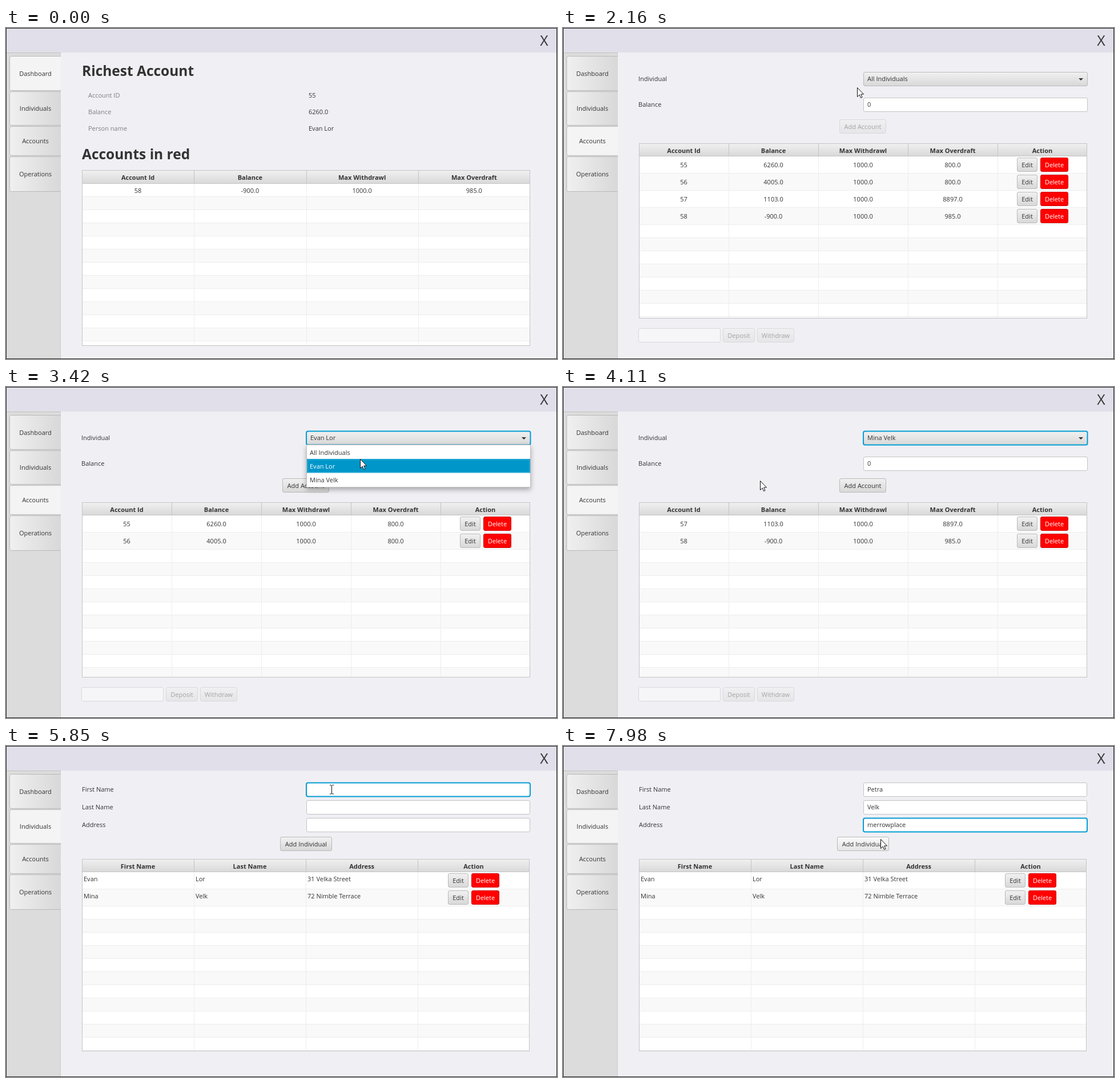
Write an HTML page that moves like this. It is 965 px wide and 580 px high and loops after 8 s.

```html
<!DOCTYPE html>
<html lang="en">
<head>
<meta charset="utf-8">
<title>Bank accounts</title>
<style>
html, body { margin: 0; width: 100%; height: 100%; overflow: hidden; background: #f0eff4; }
svg { display: block; font: 11px "Open Sans", "Noto Sans", sans-serif; }
.popup { filter: drop-shadow(0 4px 4px rgba(0, 0, 0, .3)); }
</style>
</head>
<body>
<svg width="965" height="580" viewBox="0 0 965 580">
  <defs>
    <linearGradient id="down" x2="0" y2="1"><stop stop-color="#f1f1f1"/><stop offset="1" stop-color="#d8d8d8"/></linearGradient>
    <linearGradient id="lit" x2="0" y2="1"><stop stop-color="#fafafa"/><stop offset="1" stop-color="#e4e4e4"/></linearGradient>
    <linearGradient id="across"><stop stop-color="#f0f0f0"/><stop offset="1" stop-color="#d8d8d8"/></linearGradient>
  </defs>
  <g id="view"></g>
</svg>
<script>
const LOOP = 8000, STEP = 30;
const INK = '#333', EDGE = '#b9b9b9', BLUE = '#0096c9', RING = '#039ed3';
const PEOPLE = ['All Individuals', 'Evan Lor', 'Mina Velk'];
const ACCOUNTS = [
  ['55', '6260.0', '1000.0', '800.0'],
  ['56', '4005.0', '1000.0', '800.0'],
  ['57', '1103.0', '1000.0', '8897.0'],
  ['58', '-900.0', '1000.0', '985.0']
];
const PERSONS = [['Evan', 'Lor', '31 Velka Street'], ['Mina', 'Velk', '72 Nimble Terrace']];
const TABS = [['Dashboard', 49, 61], ['Individuals', 111, 60], ['Accounts', 172, 52], ['Operations', 225, 62]];
const FIELDS = [['First Name', 64], ['Last Name', 95], ['Address', 126]];

// [start time, tab index]
const SCREENS = [[0, 0], [1110, 1], [1800, 2], [4350, 3], [4890, 1]];
// pointer path: [time, x, y]
const PATH = [
  [630, 895, 206], [900, 36, 142], [1530, 36, 142], [1680, 45, 200], [2040, 45, 200],
  [2160, 515, 104], [2340, 605, 86], [2490, 605, 86], [2640, 598, 138], [3060, 598, 138],
  [3240, 630, 88], [3360, 630, 88], [3420, 620, 126], [3600, 602, 168], [3870, 602, 168],
  [3900, 601, 167], [4020, 601, 167], [4110, 345, 164], [4260, 50, 252], [4620, 50, 252],
  [4800, 55, 138], [5160, 55, 138], [5280, 570, 76], [7830, 570, 76], [7980, 556, 163]
];
const PRESSES = [[930, 1170], [1740, 1860], [2340, 2370], [2700, 2820], [3270, 3330],
  [3660, 3780], [4290, 4410], [4830, 4920], [5580, 5640]];
const POPUPS = [[2370, 2760], [3300, 3720]];
const TYPED = [
  ['Petra', [6000, 6210, 6270, 6330, 6420]],
  ['Velk', [6540, 6690, 6780, 6840]],
  ['merrowplace', Array.from({ length: 11 }, (_, i) => 7110 + 60 * i)]
];

const pen = document.createElement('canvas').getContext('2d');
const view = document.getElementById('view');
const within = (spans, t) => spans.find(([a, b]) => t >= a && t < b) !== undefined;

const fill = (x, y, w, h, color) => `<rect x="${x}" y="${y}" width="${w}" height="${h}" fill="${color}"/>`;
const box = (x, y, w, h, color, edge = EDGE, r = 2.5) =>
  `<rect x="${x + .5}" y="${y + .5}" width="${w - 1}" height="${h - 1}" rx="${r}" fill="${color}" stroke="${edge}"/>`;
// y is the middle of the line
const text = (s, x, y, attrs = '') => `<text x="${x}" y="${y + 4}" fill="${INK}" ${attrs}>${s}</text>`;
const mid = (s, x, y, attrs = '') => text(s, x, y, 'text-anchor="middle" ' + attrs);
const faded = s => `<g opacity=".4">${s}</g>`;
const ring = (x, y, w, h) =>
  `<rect x="${x}" y="${y}" width="${w}" height="${h}" rx="3" fill="none" stroke="${RING}" stroke-width="2"/>`;

function button(s, x, y, w, color = 'url(#down)') {
  const red = color === 'red';
  return box(x, y, w, 25, color, red ? '#d00000' : EDGE) +
    mid(s, x + w / 2, y + 12.5, red ? 'style="fill:#fff"' : '');
}

function field(x, y, w, value = '', focus = false, caret = false) {
  let out = box(x, y, w, 25, '#fff', '#c3c3c3') + text(value, 533, y + 12);
  if (focus) out += ring(x, y + .5, w, 24);
  if (caret) {
    pen.font = '11px "Open Sans", "Noto Sans", sans-serif';
    out += fill(Math.round(533 + pen.measureText(value).width), y + 4, 1, 16, '#111');
  }
  return out;
}

function table(x, y, w, h, heads, rows, opt = {}) {
  const { rowH = 30, left = false, actions = false } = opt;
  const n = heads.length, top = y + (h === 308 ? 24 : 23), end = y + h - 1;
  const edge = i => Math.round(x + w * i / n);
  const center = i => x + w * (i + .5) / n;
  let out = fill(x, y, w, h, '#fff');
  for (let r = 0, ry = top; ry < end; r++) {
    const rh = r < rows.length ? rowH : 23, shown = Math.min(rh, end - ry);
    if (r % 2) out += fill(x, ry, w, shown, '#f9f9f9');
    if (shown === rh) out += fill(x, ry + rh - 1, w, 1, '#ededed');
    (rows[r] || []).forEach((s, i) => {
      out += left ? text(s, edge(i) + 3, ry + 12) : mid(s, center(i), ry + rh / 2);
    });
    if (actions && rows[r]) {
      const bx = Math.round(center(n - 1) - 45);
      out += button('Edit', bx, ry + 2, 36) + button('Delete', bx + 41, ry + 2, 49, 'red');
    }
    ry += rh;
  }
  out += fill(x, y, w, top - y, 'url(#down)') + fill(x, top - 1, w, 1, '#c4c4c4');
  heads.forEach((s, i) => {
    out += mid(s, center(i), y + 13, 'font-weight="700"');
    if (i) out += fill(edge(i), y, 1, top - y, '#c4c4c4') + fill(edge(i), top, 1, end - top, '#ededed');
  });
  return out + box(x, y, w, h, 'none', '#c4c4c4', 0);
}

function dashboard() {
  const head = (s, y) => text(s, 133, y, 'font-size="24.5" font-weight="700"');
  const info = [['Account ID', '55'], ['Balance', '6260.0'], ['Person name', PEOPLE[1]]];
  return head('Richest Account', 80) + head('Accounts in red', 226) +
    info.map(([k, v], i) => text(k, 144, 118 + 29 * i, 'opacity=".6"') + text(v, 530, 118 + 29 * i)).join('') +
    table(133, 249, 785, 308, ['Account Id', 'Balance', 'Max Withdrawl', 'Max Overdraft'], [ACCOUNTS[3]], { rowH: 23 });
}

function individuals(t, p) {
  const focus = t < 5580 ? -1 : t < 6480 ? 0 : t < 6900 ? 1 : 2;
  const caret = t < 7860 && !within([[5850, 6000]], t);
  const hover = p && p.x > 480 && p.x < 570 && p.y > 159 && p.y < 184;
  return FIELDS.map(([label, y], i) => {
    const [word, keys] = TYPED[i];
    const value = word.slice(0, keys.filter(k => k <= t).length);
    return text(label, 133, y + 12) + field(526, y, 392, value, focus === i, focus === i && caret);
  }).join('') +
    button('Add Individual', 480, 159, 91, hover ? 'url(#lit)' : undefined) +
    table(133, 198, 784, 337, ['First Name', 'Last Name', 'Address', 'Action'], PERSONS, { left: true, actions: true });
}

function popup(choice, p) {
  const rows = PEOPLE.map((s, i) => {
    const y = 102 + 24 * i;
    const lit = i === choice || (p.y >= y && p.y < y + 24);
    return (lit ? fill(527, y, 391, 24.5, BLUE) : '') +
      (i === choice ? box(528, y + 1, 389, 23, 'none', '#2fb0dc', 0) : '') +
      text(s, 532, y + 12.5, lit ? 'style="fill:#fff"' : '');
  }).join('');
  return `<g class="popup">${box(526, 101, 393, 75, '#fff', '#c0c0c0', 0)}${rows}</g>`;
}

function accounts(t, p) {
  const choice = t < 2760 ? 0 : t < 3720 ? 1 : 2;
  const rows = choice ? ACCOUNTS.slice(2 * choice - 2, 2 * choice) : ACCOUNTS;
  const add = button('Add Account', 484, 160, 82);
  return text('Individual', 132, 89) + text('Balance', 132, 134) +
    box(526, 77, 393, 25, 'url(#down)') + text(PEOPLE[choice], 533, 89) +
    `<path d="M903 88h8l-4 4z" fill="${INK}"/>` +
    (t >= 2370 ? ring(526, 77.5, 392.5, 24) : '') +
    field(526, 122, 393, '0') + (choice ? add : faded(add)) +
    table(133, 202, 785, 307, ['Account Id', 'Balance', 'Max Withdrawl', 'Max Overdraft', 'Action'], rows, { actions: true }) +
    faded(box(132, 526, 144, 25, '#fff') + button('Deposit', 280, 526, 56) + button('Withdraw', 340, 526, 65)) +
    (within(POPUPS, t) ? popup(choice, p) : '');
}

const operations = () => table(133, 202, 785, 307, ['Account Id', 'Individual', 'Operation', 'Balance'], []);

function frame(tab) {
  return fill(0, 0, 965, 580, '#f0eff4') + fill(0, 0, 965, 43, '#e0dfea') +
    fill(1, 43, 95, 537, '#dcdcdc') + fill(1, 43, 95, 1, '#c0c0c0') + fill(95, 43, 1, 537, '#cfcfcf') +
    TABS.map(([s, y, h], i) =>
      `<path d="M96 ${y + .5}H9.5q-3 0-3 3V${y + h - 3.5}q0 3 3 3H96" stroke="${EDGE}" fill="${i === tab ? '#f4f4f4' : 'url(#across)'}"/>` +
      mid(s, 51.5, y + h / 2)).join('') +
    mid('X', 942.5, 27, 'font-size="25"') + box(0, 0, 965, 580, 'none', '#2a2a2a', 0);
}

function pointerAt(t) {
  if (t < PATH[0][0]) return null;
  const i = PATH.findIndex(k => k[0] > t);
  const [t0, x0, y0] = PATH[i < 0 ? PATH.length - 1 : i - 1];
  const [t1, x1, y1] = i < 0 ? [t0 + 1, x0, y0] : PATH[i];
  const k = (t - t0) / (t1 - t0);
  return { x: Math.round(x0 + (x1 - x0) * k), y: Math.round(y0 + (y1 - y0) * k) };
}

function pointer(t, tab, { x, y }) {
  const tops = tab === 1 ? FIELDS.map(f => f[1]) : tab === 2 && !within(POPUPS, t) ? [122] : [];
  const overField = x > 526 && x < 918 && within(tops.map(top => [top, top + 25]), y);
  const glow = within(PRESSES, t) ? `<circle cx="${x - .5}" cy="${y - .5}" r="12" fill="#ffee50" opacity=".7"/>` : '';
  const shape = overField
    ? '<path d="M-3-7.5H-.5L.5-6.5L1.5-7.5H4M.5-7V7.5M-3 8H-.5L.5 7L1.5 8H4" fill="none" stroke="#111"/>'
    : '<path d="M.5.5V16.5L4.2 13L6.6 18.5L9 17.4L6.7 12H11.5Z" fill="#fff" stroke="#111"/>';
  return `${glow}<g transform="translate(${x} ${y})">${shape}</g>`;
}

function scene(t) {
  const tab = SCREENS.filter(s => s[0] <= t).pop()[1];
  const p = pointerAt(t);
  return frame(tab) + [dashboard, individuals, accounts, operations][tab](t, p) + (p ? pointer(t, tab, p) : '');
}

let shown = '';
function tick(now) {
  const next = scene(Math.floor(now % LOOP / STEP) * STEP);
  if (next !== shown) view.innerHTML = shown = next;
  requestAnimationFrame(tick);
}
tick(performance.now());
</script>
</body>
</html>
```
